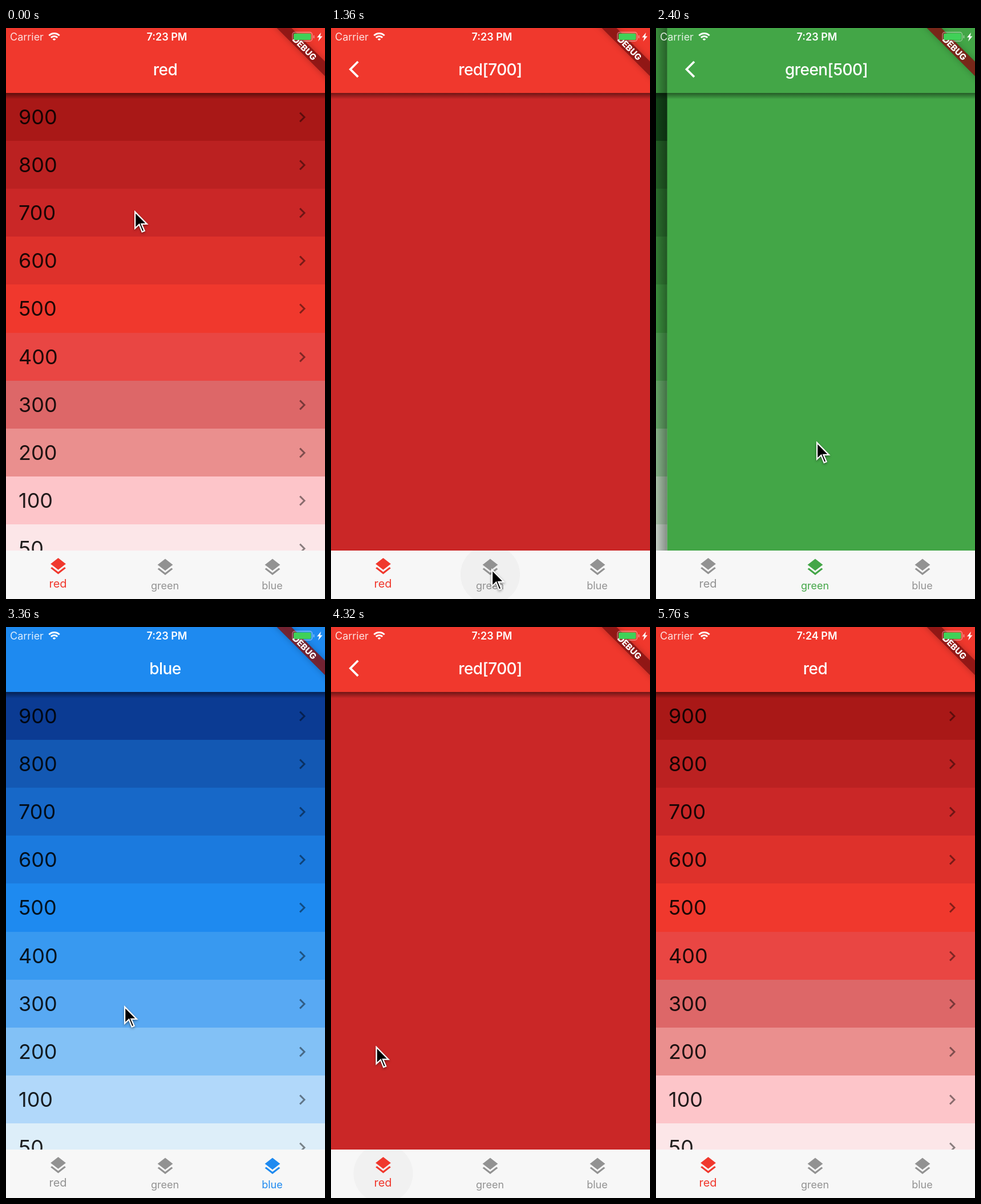
Animation of 559x1002 px, one loop 5840 ms. Source, as an HTML page with a canvas:

```html
<!DOCTYPE html>
<html lang="en">
<head>
<meta charset="utf-8">
<title>Tab navigation</title>
<style>
html, body { margin: 0; width: 100%; height: 100%; overflow: hidden; }
canvas { display: block; }
</style>
</head>
<body>
<canvas id="stage" width="559" height="1002"></canvas>
<script>
const ctx = document.getElementById('stage').getContext('2d');
const W = 559, H = 1002, LOOP = 5840;
const BAR = 114, NAV = 917, ROW = 84.1, UNIT = 1.49;
const SHADES = [900, 800, 700, 600, 500, 400, 300, 200, 100, 50];
const TABS = [
  { name: 'red', x: 91.5, y: 927, size: 20, base: 982, pick: 700,
    colors: ['#a91817', '#bb2121', '#ca2727', '#de312b', '#f0382d', '#e94643', '#dd6768', '#ea8f8e', '#fdc5c9', '#fce6e8'] },
  { name: 'green', x: 279, y: 928.5, size: 18, base: 985, pick: 500,
    colors: ['#154f1c', '#286f2c', '#308034', '#3a923d', '#43a647', '#57b45c', '#74c078', '#9bd19e', '#c3e2c4', '#e5f3e7'] },
  { name: 'blue', x: 467, y: 928.5, size: 18, base: 985, pick: 300,
    colors: ['#0b3b93', '#1358b3', '#1768c8', '#1b7ade', '#1e8af0', '#3899f0', '#58a9f3', '#82c1f6', '#b1d8fa', '#ddeef9'] }
];
const ICONS = {
  next: new Path2D('M10 6L8.59 7.41 13.17 12l-4.58 4.59L10 18l6-6z'),
  back: new Path2D('M11.67 3.87L9.9 2.1 0 12l9.9 9.9 1.77-1.77L3.54 12z'),
  layers: new Path2D('M11.99 18.54l-7.37-5.73L3 14.07l9 7 9-7-1.63-1.27-7.38 5.74zM12 16l7.36-5.73L21 9l-9-7-9 7 1.63 1.27L12 16z'),
  bolt: new Path2D('M552 8l-7 8.500h4l-2 7 7.500-9h-4z'),
  cursor: new Path2D('M0 0V34L8 26.500 13 39 19 36.500 14 25H24.500z')
};

// Timeline: tab switches, page pushes, tab presses and pointer stops (ms, x, y)
const SWITCHES = [[0, 0], [1400, 1], [2900, 2], [4120, 0]];
const PUSHES = [320, 2132, 3420], POP = 4933, SLIDE = 400;
const PRESSES = [[1180, 1], [2850, 2], [4030, 0]];
const POINTER = [
  [0, 225, 320], [620, 225, 320], [1160, 281, 948], [1460, 281, 948],
  [1980, 262, 478], [2160, 262, 478], [2400, 281, 725], [2800, 462, 948],
  [2940, 462, 948], [3300, 207, 664], [3500, 207, 664], [3840, 150, 885],
  [3990, 92, 948], [4160, 92, 948], [4660, 37, 75], [5060, 37, 75], [5440, -40, 60]
];

const clamp = v => Math.max(0, Math.min(1, v));
const easeOut = p => 1 - (1 - p) ** 3;
const smooth = p => p * p * (3 - 2 * p);

function rect(x, y, w, h, fill) {
  ctx.fillStyle = fill;
  ctx.fillRect(x, y, w, h);
}

function disc(x, y, r, fill) {
  ctx.fillStyle = fill;
  ctx.beginPath();
  ctx.arc(x, y, r, 0, 7);
  ctx.fill();
}

function text(str, x, y, size, fill, weight = 400, align = 'center', spacing = 0) {
  ctx.font = `${weight} ${size}px Inter, sans-serif`;
  ctx.letterSpacing = spacing + 'px';
  ctx.textAlign = align;
  ctx.fillStyle = fill;
  ctx.fillText(str, x, y);
}

function icon(name, x, y, fill, scale = UNIT) {
  ctx.save();
  ctx.translate(x, y);
  ctx.scale(scale, scale);
  ctx.fillStyle = fill;
  ctx.fill(ICONS[name]);
  ctx.restore();
}

function gradient(x0, y0, x1, y1, from, to) {
  const g = ctx.createLinearGradient(x0, y0, x1, y1);
  g.addColorStop(0, `rgba(0,0,0,${from})`);
  g.addColorStop(1, `rgba(0,0,0,${to})`);
  return g;
}

function appBar(tab, title) {
  rect(0, BAR, W, 11, gradient(0, BAR, 0, BAR + 11, 0.45, 0));
  rect(0, 0, W, BAR, tab.colors[4]);
  text(title, 279, 83, 28, '#fff', 500, 'center', -0.6);
}

function listPage(tab) {
  SHADES.forEach((shade, i) => {
    const y = Math.round(BAR + i * ROW);
    rect(0, y, W, 85, tab.colors[i]);
    text(shade, 22, y + 55, 36, 'rgba(0,0,0,.87)', 400, 'left');
    icon('next', 501.2, y + 24.6, 'rgba(0,0,0,.45)');
  });
  appBar(tab, tab.name);
}

function detailPage(tab, t) {
  rect(0, BAR, W, NAV - BAR, tab.colors[SHADES.indexOf(tab.pick)]);
  appBar(tab, `${tab.name}[${tab.pick}]`);
  if (t > 4780) {
    const alpha = 0.35 * clamp((t - 4780) / 80) * clamp((5250 - t) / 250);
    disc(42, 75.5, 28 * easeOut(clamp((t - 4780) / 150)), `rgba(200,200,200,${alpha})`);
  }
  icon('back', 31.3, 54.6, '#fff');
}

function pages(tab, index, t) {
  let shown = easeOut(clamp((t - PUSHES[index]) / SLIDE));
  if (t >= POP) shown = 1 - easeOut(clamp((t - POP) / SLIDE));
  const x = W * (1 - shown);
  ctx.save();
  ctx.beginPath();
  ctx.rect(0, 0, W, NAV);
  ctx.clip();
  if (shown < 1) {
    ctx.save();
    ctx.translate(-W * shown / 3, 0);
    listPage(tab);
    ctx.restore();
    // Exposes the page beneath to the left of the incoming edge only
    if (shown > 0) rect(x - 30, 0, 30, NAV, gradient(x - 30, 0, x, 0, 0, 0.42));
  }
  if (shown > 0) {
    ctx.translate(x, 0);
    detailPage(tab, t);
  }
  ctx.restore();
}

function navBar(active, t) {
  ctx.save();
  ctx.beginPath();
  ctx.rect(0, NAV, W, H - NAV);
  ctx.clip();
  rect(0, NAV, W, H - NAV, '#f7f7f7');
  for (const [start, i] of PRESSES) {
    const age = t - start;
    if (age < 0 || age > 520) continue;
    const alpha = 0.17 * clamp(age / 80) * clamp((520 - age) / 300);
    disc(TABS[i].x, 959, 52 * easeOut(clamp(age / 170)), `rgba(200,200,200,${alpha})`);
  }
  TABS.forEach((tab, i) => {
    const fill = i === active ? tab.colors[4] : '#929292';
    icon('layers', tab.x - 12 * UNIT, tab.y, fill);
    text(tab.name, tab.x - 0.5, tab.base, tab.size, fill);
  });
  ctx.restore();
}

function debugBanner() {
  ctx.save();
  ctx.translate(W, 0);
  ctx.rotate(Math.PI / 4);
  ctx.shadowColor = 'rgba(0,0,0,.5)';
  ctx.shadowBlur = 12;
  rect(-90, 41.7, 180, 17.9, 'rgba(0,0,0,.5)');
  ctx.shadowColor = 'transparent';
  rect(-90, 41.7, 180, 17.9, 'rgba(175,25,25,.63)');
  text('DEBUG', 0, 56, 15, '#fff', 800);
  ctx.restore();
}

function statusBar(t) {
  text('Carrier', 7, 22, 18, 'rgba(255,255,255,.85)', 400, 'left');
  text(t < 4400 ? '7:23 PM' : '7:24 PM', 282, 22, 18, '#fff', 600);
  ctx.strokeStyle = '#fff';
  ctx.lineWidth = 3;
  for (const r of [2.5, 8, 13]) {
    ctx.beginPath();
    ctx.arc(84.5, 22.5, r, -Math.PI * 0.75, -Math.PI * 0.25);
    ctx.stroke();
  }
  ctx.strokeStyle = 'rgba(255,255,255,.45)';
  ctx.lineWidth = 1.3;
  ctx.beginPath();
  ctx.roundRect(502, 7.5, 34.5, 15.5, 4);
  ctx.stroke();
  ctx.fillStyle = '#40d158';
  ctx.beginPath();
  ctx.roundRect(504, 9.5, 30.5, 11.5, 2);
  ctx.fill();
  rect(538.5, 13, 1.8, 5, 'rgba(255,255,255,.45)');
  icon('bolt', 0, 0, '#fff', 1);
}

function pointer(t) {
  const next = POINTER.findIndex(stop => stop[0] > t);
  if (next < 0) return;
  const [t0, x0, y0] = POINTER[next - 1], [t1, x1, y1] = POINTER[next];
  const p = smooth((t - t0) / (t1 - t0));
  ctx.save();
  ctx.translate(x0 + (x1 - x0) * p, y0 + (y1 - y0) * p);
  ctx.save();
  ctx.shadowColor = 'rgba(0,0,0,.4)';
  ctx.shadowBlur = 4;
  ctx.shadowOffsetY = 2;
  ctx.fillStyle = '#fff';
  ctx.fill(ICONS.cursor);
  ctx.restore();
  ctx.clip(ICONS.cursor);
  ctx.fillStyle = '#000';
  ctx.fill(ICONS.cursor);
  ctx.strokeStyle = '#fff';
  ctx.lineWidth = 4.4;
  ctx.stroke(ICONS.cursor);
  ctx.restore();
}

function draw() {
  const t = performance.now() % LOOP;
  const active = SWITCHES.findLast(s => s[0] <= t)[1];
  pages(TABS[active], active, t);
  navBar(active, t);
  debugBanner();
  statusBar(t);
  pointer(t);
  requestAnimationFrame(draw);
}
draw();
</script>
</body>
</html>
```
